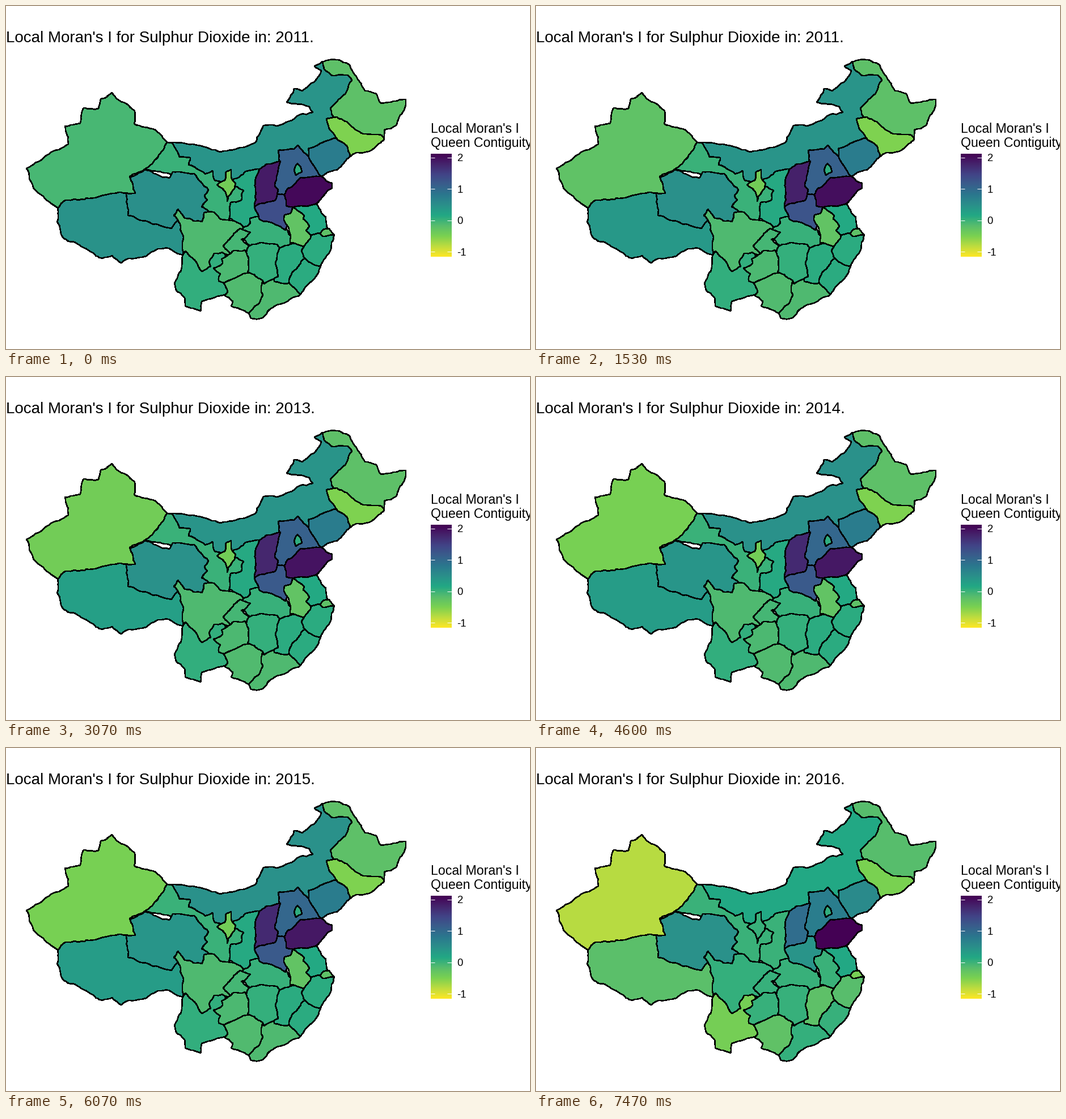
A matplotlib script that plays this animation: 924 px wide and 606 px high, repeating every 8000 ms.

```python
import numpy as np
import matplotlib.pyplot as plt
from matplotlib.animation import FuncAnimation
from matplotlib.collections import PolyCollection
from matplotlib.colors import LinearSegmentedColormap, Normalize

W, H, DPI = 924, 606, 100
PX = 72 / DPI
FRAMES, LOOP = 120, 8000
LOW, HIGH = -1.16, 2.117

cmap = LinearSegmentedColormap.from_list("scale", [
    "#FDE725", "#BDDC3F", "#7AD151", "#58BD6C", "#22A884", "#2A908A",
    "#2A788E", "#385F8C", "#414487", "#45256D", "#440154"], N=512)
norm = Normalize(LOW, HIGH)

# Later regions cover earlier ones, so each border is traced only once.
rng = np.random.default_rng(4)
shapes, levels = [], []


def crinkle(p, q):
    """Points from p up to q, bent by midpoint displacement."""
    d = q - p
    size = np.hypot(*d)
    if size < 6:
        return [p]
    bend = np.clip(rng.normal(0, min(.06 * size, 1.3)), -2, 2) / size
    mid = (p + q) / 2 + bend * np.array([-d[1], d[0]])
    return crinkle(p, mid) + crinkle(mid, q)


def region(first, last, points, mid=None):
    """Add a region; mid holds its levels at the three stages in between."""
    pts = np.reshape(points, (-1, 2)).astype(float)
    edges = zip(pts, np.roll(pts, -1, axis=0))
    shapes.append(np.array([v for p, q in edges for v in crinkle(p, q)]))
    c, d, e = mid or (first,) * 3
    levels.append([first, (first + c) / 2, c, d, e, (e + last) / 2, last])


# Tibet
region(.45, -.2, [
    92, 357, 90, 381, 102, 411, 133, 425, 149, 434, 170, 446, 187, 441, 203, 454,
    216, 446, 240, 444, 268, 429, 287, 428, 313, 440, 318, 380, 280, 370, 225, 350,
    218, 322, 110, 335], mid=(.28, .18, .31))
# Inner Mongolia
region(.42, .15, [
    285, 241, 330, 244, 378, 258, 441, 240, 454, 211, 478, 212, 518, 192, 541, 188,
    535, 178, 495, 170, 508, 146, 522, 150, 545, 133, 556, 114, 544, 106, 558, 98,
    590, 110, 616, 130, 590, 195, 585, 245, 490, 285, 440, 297, 375, 330, 305, 275],
    mid=(.42, .42, .46))
# Shaanxi
region(.13, .01, [
    390, 315, 412, 302, 423, 292, 446, 288, 455, 300, 455, 360, 442, 390, 415, 396,
    390, 372])
# Gansu
region(.01, .01, [
    285, 241, 293, 242, 306, 267, 325, 268, 322, 281, 351, 297, 364, 291, 368, 308,
    398, 312, 419, 326, 415, 343, 396, 347, 395, 365, 394, 382, 360, 375, 330, 330,
    300, 300, 235, 285, 270, 250])
# Qinghai
region(.49, .47, [
    215, 305, 244, 290, 288, 304, 294, 293, 331, 296, 357, 325, 350, 336, 355, 343,
    345, 355, 357, 363, 345, 385, 303, 378, 292, 393, 268, 386, 235, 378, 215, 370,
    212, 332], mid=(.46, .42, .41))
# Xinjiang
region(-.08, -.8, [
    285, 241, 264, 219, 226, 208, 227, 185, 194, 163, 187, 153, 180, 158, 167, 164,
    163, 181, 137, 180, 131, 207, 104, 212, 110, 244, 75, 262, 57, 275, 36, 287,
    49, 323, 61, 333, 92, 357, 105, 343, 138, 342, 203, 329, 228, 331, 218, 301,
    245, 288, 268, 267], mid=(-.43, -.55, -.48))
# Yunnan
region(.05, -.45, [
    313, 435, 309, 466, 297, 490, 300, 502, 314, 514, 316, 530, 343, 539, 345, 522,
    389, 509, 400, 490, 390, 452, 385, 430, 330, 430])
# Sichuan
region(-.12, .04, [
    303, 359, 315, 375, 346, 381, 349, 365, 366, 364, 379, 377, 397, 379, 417, 388,
    420, 398, 397, 425, 397, 440, 381, 435, 367, 437, 358, 452, 361, 460, 346, 469,
    333, 449, 317, 433, 313, 437, 312, 405, 307, 385, 296, 370])
# Hubei
region(.02, .02, [
    418, 392, 431, 383, 430, 375, 460, 370, 492, 388, 508, 415, 500, 432, 432, 430,
    412, 402])
# Chongqing
region(-.06, .03, [
    413, 393, 431, 400, 415, 412, 428, 424, 425, 438, 400, 440, 383, 424, 400, 406])
# Guangxi
region(-.13, -.25, [
    384, 490, 420, 465, 456, 478, 462, 515, 440, 545, 428, 543, 397, 530, 400, 522,
    385, 511, 391, 505])
# Guangdong
region(-.12, .04, [
    519, 510, 490, 525, 465, 536, 452, 551, 432, 552, 428, 543, 443, 528, 453, 511,
    450, 499, 460, 475, 500, 478, 525, 495])
# Guizhou
region(-.1, .03, [
    382, 455, 380, 447, 402, 432, 421, 431, 434, 440, 436, 466, 418, 473, 385, 489,
    375, 486, 378, 473, 366, 463])
# Jiangxi
region(.1, -.23, [
    484, 427, 501, 421, 525, 415, 535, 430, 515, 475, 499, 489, 473, 487, 465, 440])
# Hunan
region(.04, .03, [
    428, 424, 452, 418, 478, 421, 483, 427, 475, 455, 480, 478, 465, 485, 455, 491,
    448, 482, 426, 470, 428, 461, 424, 434])
# Ningxia
region(-.43, .02, [
    397, 289, 398, 305, 405, 313, 390, 345, 384, 325, 372, 316, 386, 308, 388, 293])
# Hebei
region(1.1, .74, [
    482, 274, 480, 255, 508, 253, 515, 246, 523, 256, 530, 262, 556, 290, 554, 300,
    545, 310, 490, 342, 465, 340, 468, 290], mid=(1.1, 1.03, 1.03))
# Beijing
region(.07, .06, [514, 278, 519, 283, 522, 293, 511, 299, 508, 290])
# Henan
region(1.33, .43, [
    445, 345, 477, 333, 490, 333, 508, 352, 500, 372, 493, 396, 480, 388, 446, 376,
    438, 355], mid=(1.2, 1.2, 1.2))
# Shanxi
region(1.88, .95, [
    446, 290, 458, 280, 484, 274, 474, 318, 480, 325, 474, 344, 438, 354, 440, 305],
    mid=(1.77, 1.75, 1.74))
# Anhui
region(-.27, .01, [
    505, 356, 512, 357, 542, 385, 548, 412, 532, 428, 501, 419, 498, 391, 490, 378,
    491, 369, 503, 364])
# Zhejiang
region(.1, -.18, [
    537, 410, 540, 398, 570, 400, 579, 405, 573, 430, 555, 459, 545, 468, 527, 446,
    521, 432])
# Fujian
region(.1, .03, [
    527, 446, 541, 456, 555, 460, 544, 482, 519, 510, 499, 489, 505, 470])
# Jiangsu
region(.14, .15, [
    505, 355, 540, 340, 564, 373, 570, 399, 537, 405, 529, 397, 535, 389, 524, 376,
    526, 370, 510, 358])
# Shanghai
region(-.24, -.47, [554, 402, 558, 396, 570, 393, 579, 405, 558, 407])
# Shandong
region(2.05, HIGH, [
    497, 322, 520, 303, 556, 301, 575, 313, 575, 322, 548, 349, 530, 354, 494, 353,
    494, 343, 491, 333], mid=(1.95, 1.89, 1.91))
# Heilongjiang
region(-.23, -.17, [
    558, 98, 583, 95, 606, 104, 618, 125, 633, 150, 653, 155, 662, 172, 705, 165,
    702, 184, 688, 211, 667, 219, 667, 232, 640, 238, 580, 200, 572, 181, 601, 150,
    610, 131, 602, 122, 575, 123, 561, 112])
# Liaoning
region(.76, .56, [
    533, 252, 545, 248, 582, 233, 610, 245, 607, 265, 583, 290, 554, 300, 534, 268])
# Jilin
region(-.52, -.5, [
    565, 199, 583, 196, 605, 208, 630, 226, 662, 228, 667, 235, 658, 243, 640, 257,
    618, 259, 607, 266, 601, 247, 582, 233, 570, 217])

levels = np.array(levels)

fig = plt.figure(figsize=(W / DPI, H / DPI), dpi=DPI, facecolor="white")
ax = fig.add_axes([0, 0, 1, 1])


def label(x, y, text, size):
    return ax.text(x, y, text, fontsize=size * PX, family="Liberation Sans",
                   color="black", va="baseline", ha="left")


land = PolyCollection(shapes, edgecolors="black", linewidths=1.5 * PX,
                      antialiaseds=False, joinstyle="round")
ax.add_collection(land)

ax.imshow(np.linspace(HIGH, LOW, 182)[:, None], cmap=cmap, norm=norm,
          extent=(749, 785.5, 443, 261), aspect="auto", interpolation="nearest")
for value in range(-1, 3):
    y = 378.5 - 55.5 * value
    for x in (749, 778.2):
        ax.plot([x, x + 7.3], [y, y], color="white", lw=PX, solid_capstyle="butt")
    label(795.5, y + 6.6, str(value), 18.5)
label(748.7, 223.5, "Local Moran's I", 23.1)
label(748.7, 248.5, "Queen Contiguity", 23.1)
title = label(0, 64.3, "", 27.7)

ax.set_xlim(0, W)
ax.set_ylim(H, 0)
ax.axis("off")

# first frame, column of levels, year
CUES = [(0, 0, 2011), (22, 1, 2011), (23, 2, 2012), (46, 2, 2013), (68, 3, 2013),
        (69, 4, 2014), (91, 4, 2015), (111, 5, 2015), (112, 6, 2016)]


def draw(frame):
    _, column, year = [cue for cue in CUES if cue[0] <= frame][-1]
    land.set_facecolor(cmap(norm(levels[:, column])))
    title.set_text(f"Local Moran's I for Sulphur Dioxide in: {year}.")
    return land, title


anim = FuncAnimation(fig, draw, frames=FRAMES, interval=LOOP / FRAMES,
                     repeat=True, repeat_delay=0, blit=False)
plt.show()
```
